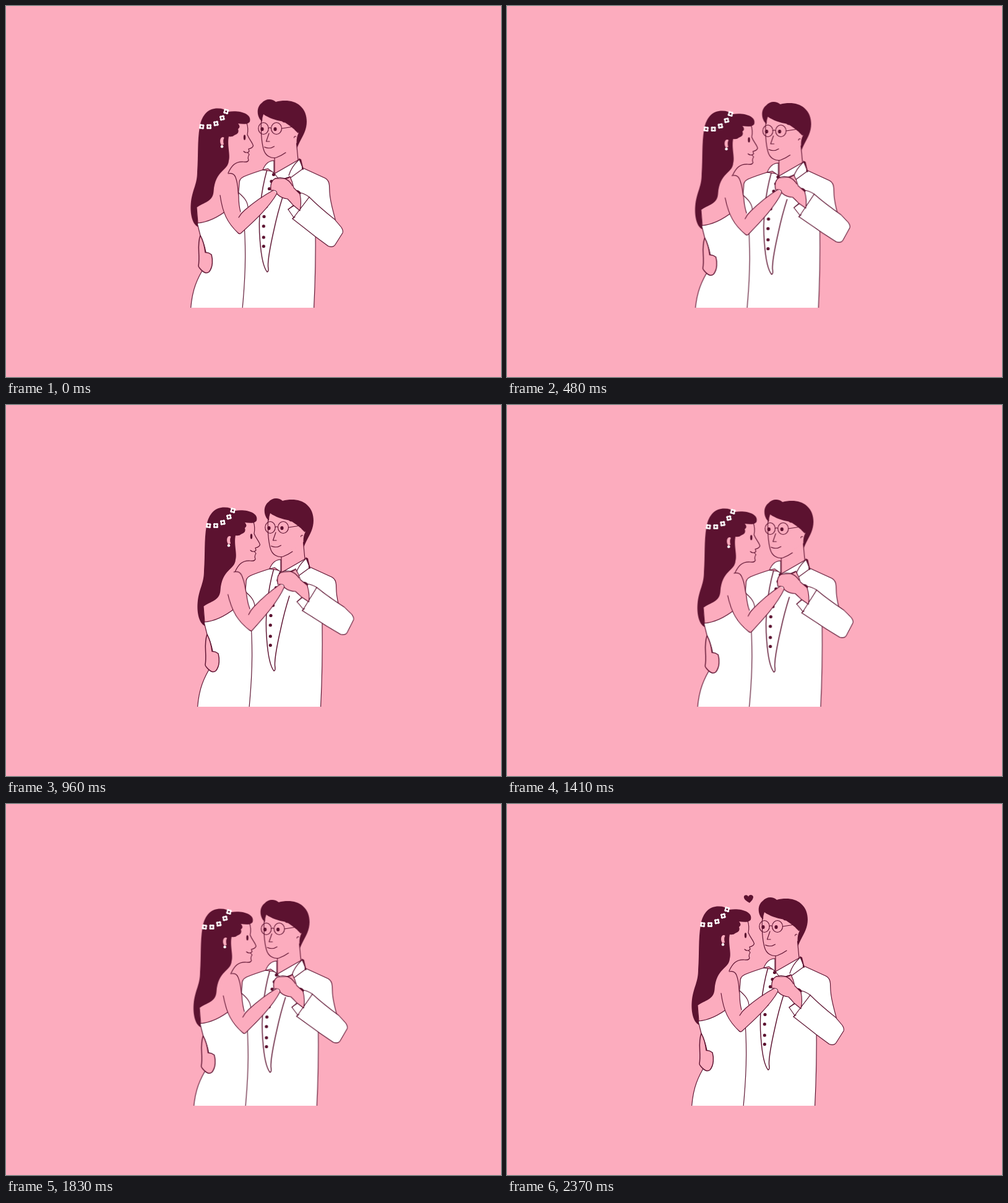
These frames come from a looping animation (800 by 600 pixels, 2.64 s). An HTML page:

```html
<!DOCTYPE html>
<html lang="en">
<head>
<meta charset="utf-8">
<title>Wedding dance</title>
<style>
  :root { --pink: #fcacbe; --dark: #5c1230; --loop: 2640ms linear infinite; }
  html, body { margin: 0; width: 100%; height: 100%; overflow: hidden; background: var(--pink); }
  svg { display: block; width: 100%; height: 100%; }
  .art { stroke: var(--dark); stroke-width: 1.15; stroke-linecap: round; stroke-linejoin: round; fill: none; }
  .white { fill: #fff; }
  .skin { fill: var(--pink); }
  .dark { fill: var(--dark); stroke: none; }
  .bold { stroke-width: 1.45; }
  .bare { stroke: none; }

  .sway { animation: sway var(--loop); }
  .dip { animation: dip var(--loop); }
  .arms { transform-origin: 350px 290px; animation: lift var(--loop); }
  .heart { transform-origin: 390.5px 152.5px; animation: pop var(--loop); }

  @keyframes sway {
    0%, 84.85%, 100% { transform: translateX(0); }
    36.36%, 47.73% { transform: translateX(11px); }
  }
  @keyframes dip {
    0%, 36.36%, 47.73% { transform: translateY(0); animation-timing-function: cubic-bezier(.39, .575, .565, 1); }
    18.18%, 66.29% { transform: translateY(4px); animation-timing-function: cubic-bezier(.47, 0, .745, .715); }
    84.85%, 100% { transform: translateY(0); }
  }
  @keyframes lift {
    0%, 83.33%, 100% { transform: rotate(0); }
    9.09% { transform: rotate(-1.85deg); }
    18.18% { transform: rotate(-3.6deg); }
    36.36%, 47.73% { transform: rotate(-5.7deg); }
  }
  @keyframes pop {
    0%, 75% { transform: scale(0); animation-timing-function: ease-out; }
    89.77%, 100% { transform: scale(1); }
  }
</style>
</head>
<body>
<svg viewBox="0 0 800 600">
  <defs>
    <clipPath id="hem"><path d="M0 0H800V488H0Z"/></clipPath>
    <g id="flower" stroke="none">
      <g fill="#fff">
        <circle cx="-1.900" cy="-1.900" r="2.200"/><circle cx="1.900" cy="-1.900" r="2.200"/>
        <circle cx="-1.900" cy="1.900" r="2.200"/><circle cx="1.900" cy="1.900" r="2.200"/>
        <path d="M-3.300 -3.300h6.600v6.600h-6.600z"/>
      </g>
      <circle class="dark" r="1.500"/>
    </g>
  </defs>

  <g clip-path="url(#hem)"><g class="sway"><g class="dip art">

    <!-- groom: jacket -->
    <path class="white" d="M415 265C402 269 391 273 384 276Q376 280 377 288L372 345V500H497C499 460 501 430 500 352L533 349C529 332 524 318 523 302L522.500 290Q522 282 516 278.500L480 262L434 268Z"/>
    <path d="M376 302C384 309 390 315 391 325"/>
    <path class="skin bare" d="M434 246V271L473 248L469.500 222Z"/>
    <path d="M434 246V271M472 249L469.500 222"/>
    <path class="white" d="M415 265C419 255 425 250 433 250V270L423 263Z"/>
    <path class="bold" d="M421.500 266C412 300 407 342 410.500 380C412.500 406 417 424 422 430Q425 430 423.500 421C423 407 428 384 433 362Q439 334 447 309"/>
    <path class="white" d="M434 271L474 248L480 263L458 279L446 287Z"/>
    <path d="M457 274Q461 260 474 248"/>
    <path class="dark" d="M473 246L477 248L481 265L478 264Q479 256 474 249Z"/>
    <g class="dark">
      <circle cx="432.500" cy="272.500" r="2.600"/><circle cx="429" cy="283.500" r="2.600"/>
      <circle cx="425.500" cy="295.500" r="2.600"/><circle cx="420.500" cy="324" r="2.600"/>
      <circle cx="417" cy="340.500" r="2.600"/><circle cx="416.300" cy="356" r="2.600"/>
      <circle cx="416.300" cy="374" r="2.600"/><circle cx="416.300" cy="388.500" r="2.600"/>
    </g>

    <!-- groom: head -->
    <path d="M413 180C411 198 413 220 416 231C419 243 429 247 437 245Q445 242 452 237"/>
    <path class="dark" d="M414 187C405 180 404 164 413 157C420 149 430 150 436 155C451 151 466 153 475 161C488 172 488 191 482.500 204C479 213 473 221 470.500 230C469 221 469 212 473 205Q465 199 459 194L451 188.500Q448 189 446 186.500C437 185 424 181 416 175Q414 180 414 187Z"/>
    <path d="M467 200L472 205M465.500 213Q466 210 468.500 211"/>
    <ellipse cx="416" cy="198" rx="8.200" ry="9.500"/>
    <ellipse cx="437" cy="198" rx="8.500" ry="9.500"/>
    <path d="M424 197.500Q426 196 428.500 197.500M445.500 198L468 194.500"/>
    <ellipse class="dark" cx="414" cy="199" rx="2.600" ry="3.100"/>
    <ellipse class="dark" cx="435" cy="199" rx="2.600" ry="3.100"/>
    <path d="M425 206L420.500 219H426M417.500 228Q426 232 433.500 227"/>

    <!-- bride: dress and the hand at her waist -->
    <path class="white" d="M309 351Q333 349.500 360 328L385 353C388 400 387 440 381 500H298C299 466 306 447 317 428L323 398Q320 383 314 371Z"/>
    <path class="skin bold" d="M314 371C308 387 314 402 311 420Q311 422 313 424Q322 435 328 430C335 422 334 409 332 402Q327 398 322 398.500Q320 382 314 371Z"/>

    <!-- bride: head -->
    <path d="M389 189Q392 198 390 208C393 216 398 220 399.500 226Q398 230 392 231L393 235L390.500 237L393 240Q390 245 392 249Q391 253 384 252C370 251 364 259 359 270M384 235Q387 238 391 236.500"/>
    <ellipse class="dark" cx="385.500" cy="212.500" rx="1.700" ry="4.200"/>
    <path class="dark" d="M313 195C317 175 327 165.500 342 165.500Q353 165.500 359 171C377 168 398 174 394 187C391 192 382 191 375 190Q380 195 375 199Q378 206 369 209Q366 212 360 211C357 224 363 242 360 250C359 267 338 265 335.500 300C334 317 320 317 308 326L310 357C300 352 297 333 299 316C302 295 309 288 309 268C311 240 309 220 313 195Z"/>
    <path class="skin bare" d="M351 212C345 211 345 222 348.500 225L352 224Q350 218 352.500 213Z"/>
    <circle class="white bare" cx="349" cy="227.300" r="2.200"/>
    <path d="M308 326L310 351"/>
    <use href="#flower" transform="translate(316.200 195) rotate(8)"/>
    <use href="#flower" transform="translate(328 195)"/>
    <use href="#flower" transform="translate(339.300 190) rotate(-10)"/>
    <use href="#flower" transform="translate(349.300 181) rotate(-12)"/>
    <use href="#flower" transform="translate(355.700 170.500) rotate(15)"/>

    <!-- joined arms -->
    <g class="arms">
      <path class="white" d="M490 309C504 323 521 337 531 345L542 358Q545.500 364 544 367L532 386Q529 391 521 388.500L500 373Q481 358 463 344Z"/>
      <path class="white" d="M475 302Q482 303 490 309L465 342L456 329L474 315Z"/>
      <path d="M456 329Q462 324 476 318M463 344L467 341"/>
      <path class="dark" d="M467 298Q474 297 477 303L473 307Z"/>

      <path class="skin bare" d="M346 306Q340 280 359 271Q368 269 371 277C376 290 374 300 376 306Q376 322 379 335L383 332Q409 311 432 298L438 303C425 326 401 348 379 368L376 368C358 351 350 335 346 306Z"/>
      <path d="M346 306C350 335 358 351 375 367Q377 369 379 368C401 348 425 326 438 303"/>
      <path d="M359 271Q368 269 371 277C376 290 374 300 376 306Q376 322 379 333M376 342Q380 335 386 330Q408 311 432 298"/>

      <path class="skin" d="M428 298C427 289 429 282 435 279L450 279L459 276Q463 284 465 294L475 304Q478 318 475 331L464 322Q459 316 455 312Q445 311 438 304Q438 298 432 298Z"/>
      <path d="M435 279C449 274 459 283 463 291M450 279Q456 279 459 276"/>
    </g>
  </g></g></g>

  <path class="heart dark" d="M392 160C386 157 382 153 383 149.500C384 146.500 389 146.500 390 150C391 145.800 397 146 398 150C398 154 395 157 392 160Z"/>
</svg>
</body>
</html>
```
